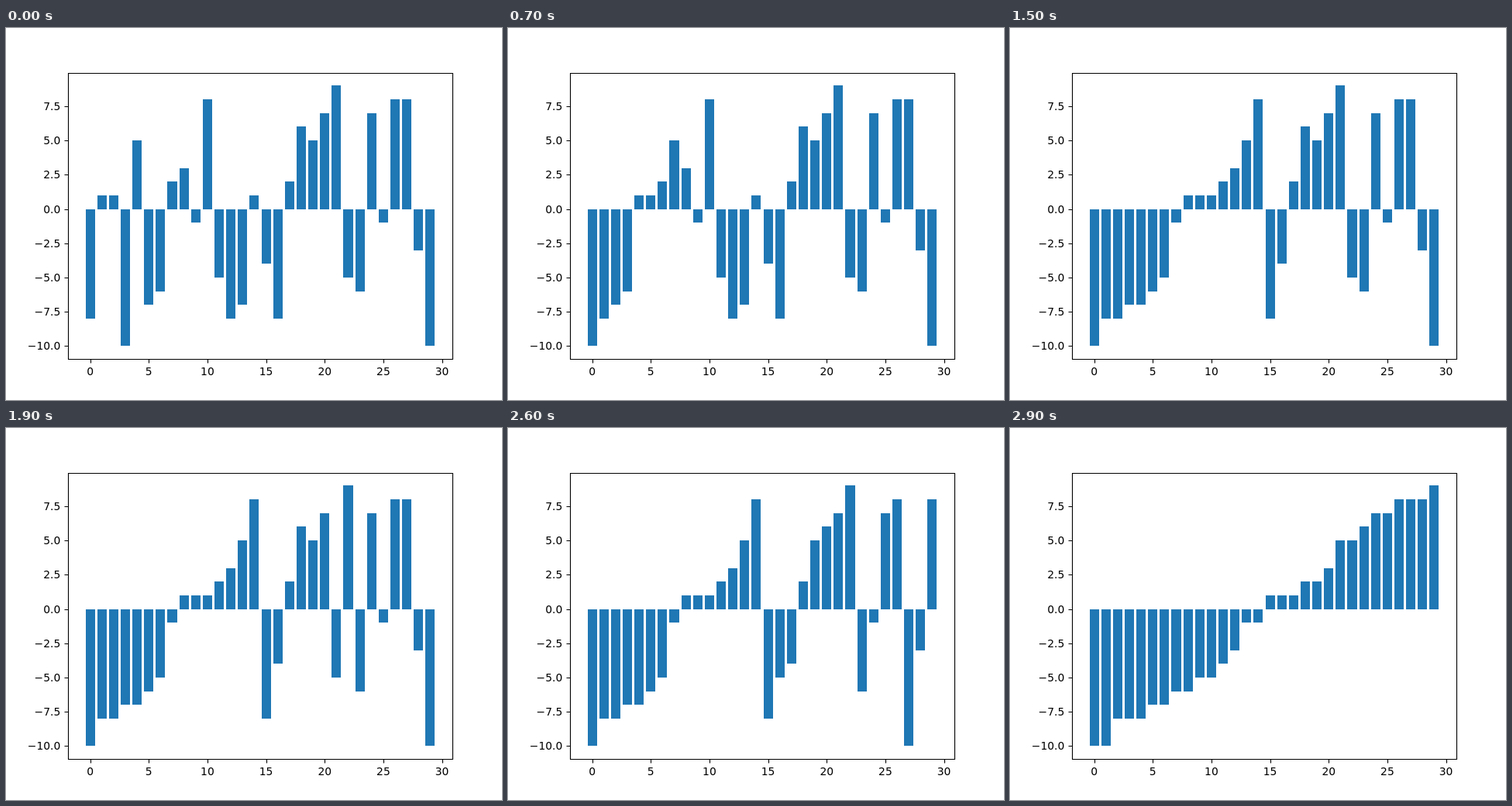
An HTML page with a canvas that plays this animation: 640x480 px, repeating every 3.6 s.

```html
<!DOCTYPE html>
<html lang="en">
<head>
<meta charset="utf-8">
<title>Merge sort</title>
<style>
  html, body { margin: 0; width: 100%; height: 100%; overflow: hidden; background: #fff; }
  canvas { display: block; }
</style>
</head>
<body>
<canvas id="chart" width="640" height="480"></canvas>
<script>
const ctx = document.getElementById('chart').getContext('2d');
const LOOP = 3600, STEP = 100;
const LEFT = 80, RIGHT = 576, TOP = 58, BOTTOM = 427;

const values = [-8, 1, 1, -10, 5, -7, -6, 2, 3, -1, 8, -5, -8, -7, 1,
                -4, -8, 2, 6, 5, 7, 9, -5, -6, 7, -1, 8, 8, -3, -10];

const xAt = i => LEFT + (i + 1.89) * 496 / 32.78;
const yAt = v => 57.6 + (9.95 - v) * 369.6 / 20.9;

// One snapshot after every merge of the recursive sort
const states = [[...values]];
function mergeSort(lo, hi) {
  if (lo >= hi) return;
  const mid = (lo + hi) >> 1;
  mergeSort(lo, mid);
  mergeSort(mid + 1, hi);
  const merged = values.slice(lo, hi + 1).sort((a, b) => a - b);
  values.splice(lo, merged.length, ...merged);
  states.push([...values]);
}
mergeSort(0, values.length - 1);

function drawBars(bars) {
  ctx.fillStyle = '#1f77b4';
  const zero = Math.round(yAt(0));
  bars.forEach((v, i) => {
    const x = Math.round(xAt(i - 0.4));
    ctx.fillRect(x, zero, Math.round(xAt(i + 0.4)) - x, Math.round(yAt(v)) - zero);
  });
}

function drawAxes() {
  ctx.fillStyle = ctx.strokeStyle = '#000';
  ctx.lineWidth = 1.11;
  ctx.font = '13.89px "DejaVu Sans", sans-serif';
  ctx.beginPath();
  ctx.rect(LEFT + 0.5, TOP + 0.5, RIGHT - LEFT, BOTTOM - TOP);

  ctx.textAlign = 'center';
  for (let i = 0; i <= 30; i += 5) {
    const x = Math.round(xAt(i)) + 0.5;
    ctx.moveTo(x, BOTTOM + 0.5);
    ctx.lineTo(x, BOTTOM + 5.5);
    ctx.fillText(i, xAt(i), 448);
  }

  ctx.textAlign = 'right';
  for (let v = -10; v <= 7.5; v += 2.5) {
    const y = Math.round(yAt(v));
    ctx.moveTo(LEFT + 0.5, y + 0.5);
    ctx.lineTo(LEFT - 4.5, y + 0.5);
    ctx.fillText(v.toFixed(1).replace('-', '\u2212'), 70.3, y + 5);
  }
  ctx.stroke();
}

function render() {
  const step = Math.floor(performance.now() % LOOP / STEP);
  ctx.fillStyle = '#fff';
  ctx.fillRect(0, 0, 640, 480);
  drawBars(states[Math.min(step, states.length - 1)]);
  drawAxes();
  requestAnimationFrame(render);
}
render();
</script>
</body>
</html>
```
